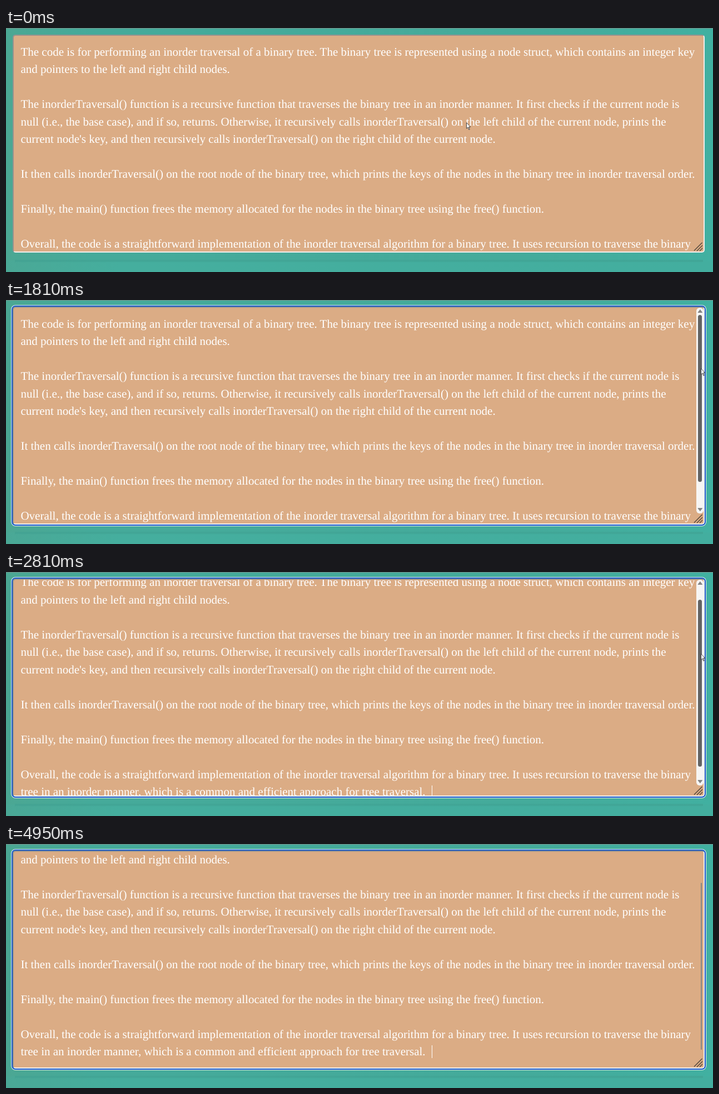
Write an HTML page that moves like this. It is 1272x440 px and loops after 5.23 s.

```html
<!DOCTYPE html>
<html lang="en">
<head>
<meta charset="utf-8">
<title>Scrolling text area</title>
<style>
  html, body { margin: 0; width: 100%; height: 100%; overflow: hidden; }
  body { background: #45ae9e; }
  #stage { position: relative; width: 1272px; height: 440px; overflow: hidden;
    background: linear-gradient(90deg, #4ba793, #45aa9a 12%, #44ab9b 75%, #41b0a1); }
  #stage div, #stage svg { position: absolute; box-sizing: border-box; }

  .topline { left: 0; top: 0; width: 1272px; height: 1px; background: #75908a; }
  .below { left: 0; top: 419px; width: 1272px; height: 21px;
    background: linear-gradient(90deg, #4aa896, #45ae9e 16%, #43ae9f); }
  .shade { left: 16px; top: 417px; width: 1238px; height: 6px;
    background: linear-gradient(#3f9f9000, #3f9f90b0, #3f9f9000); }

  #box { left: 12px; top: 12px; width: 1245px; height: 393px;
    border: 2px solid; border-color: #98938e #f1eeec #f1eeec #98938e;
    border-radius: 5px; background: #dbac85; }
  #box.focus { box-shadow: 0 0 0 2px #1458c8, 0 0 0 3px #e4efee; }
  #clip { left: 0; top: 0; width: 1241px; height: 389px; overflow: hidden; border-radius: 3px; }
  #text { left: 12.4px; white-space: pre; color: #fff;
    font: 21.03px/31.5px "Liberation Serif", "Times New Roman", serif;
    text-rendering: geometricPrecision; }
  #caret { left: 740px; top: 382px; width: 1px; height: 23px; background: #fff; }

  #track { left: 1241.5px; top: 14px; width: 13.5px; height: 371px;
    border-radius: 6px; background: #f6f5f4; }
  #thumb { height: 301px; border-radius: 4px; background: #858585; }
  #thumb.wide { left: 1245px; width: 7px; }
  #thumb.thin { left: 1250px; width: 2px; }
  #thumb.pressed { background: #636363; }
</style>
</head>
<body>
<div id="stage">
  <div class="topline"></div>
  <div class="below"></div>
  <div class="shade"></div>
  <div id="box">
    <div id="clip">
      <div id="text">The code is for performing an inorder traversal of a binary tree. The binary tree is represented using a node struct, which contains an integer key
and pointers to the left and right child nodes.

The inorderTraversal() function is a recursive function that traverses the binary tree in an inorder manner. It first checks if the current node is
null (i.e., the base case), and if so, returns. Otherwise, it recursively calls inorderTraversal() on the left child of the current node, prints the
current node's key, and then recursively calls inorderTraversal() on the right child of the current node.

It then calls inorderTraversal() on the root node of the binary tree, which prints the keys of the nodes in the binary tree in inorder traversal order.

Finally, the main() function frees the memory allocated for the nodes in the binary tree using the free() function.

Overall, the code is a straightforward implementation of the inorder traversal algorithm for a binary tree. It uses recursion to traverse the binary
tree in an inorder manner, which is a common and efficient approach for tree traversal.<div id="caret"></div></div>
    </div>
  </div>
  <svg style="left:1237px;top:386px" width="18" height="18" fill="none" stroke="#4d4339" stroke-width="1.3">
    <path d="M1 15.5 15.5 1M6 16 16 6M11 16 16 11"/>
  </svg>
  <div id="track">
    <svg style="left:0;top:0" width="14" height="371" fill="#858585" stroke="#858585" stroke-linejoin="round">
      <path d="M3 8.5 6.8 3.5 10.6 8.5ZM3 361.5 6.8 366.5 10.6 361.5Z"/>
    </svg>
  </div>
  <div id="thumb"></div>
  <svg id="cursor" style="left:0;top:0" width="9" height="15" fill="#fff" stroke="#333" stroke-width=".9" stroke-linejoin="round">
    <path d="M.5.6V11.2L3 9 4.8 13.4 6.3 12.8 4.6 8.5H7.7Z"/>
  </svg>
</div>
<script>
const LOOP = 5230;
const $ = id => document.getElementById(id);

// Each track holds [start time, value...] steps.
const cursorTrack = [
  [0, 828, 170], [130, 827, 169], [270, 764, 296], [400, 1255, 123],
  [550, 1239, 122], [700, 1225, 121], [830, 1228, 121], [980, 1238, 122],
  [1100, 1244, 122], [1240, 1250, 122], [1810, 1250, 123], [2240, 1251, 124],
  [2390, 1251, 128], [2540, 1251, 131], [2670, 1250, 139], [2810, 1250, 147],
  [2930, 1248, 158], [3050, 1246, 168], [3200, 1244, 178], [3330, 1242, 187],
  [3480, 1243, 188], [3780]
];
const scrollTrack = [
  [0, 0], [2240, 1], [2390, 4], [2540, 8], [2670, 16],
  [2810, 24.5], [2930, 36], [3050, 45.5], [3200, 46.5]
];
const barTrack = [
  [0, ""], [550, "wide"], [700, "thin"], [980, "wide"],
  [1810, "wide pressed"], [3630, "wide"], [3910, "thin"]
];
const caretTrack = [
  [0, false], [2810, true], [3330, false], [3780, true], [4330, false], [4950, true]
];

const at = (track, t) => track.findLast(step => step[0] <= t).slice(1);
const show = (el, visible) => { el.style.visibility = visible ? "visible" : "hidden"; };

function draw(now) {
  const t = now % LOOP;
  const [x, y] = at(cursorTrack, t);
  const [scroll] = at(scrollTrack, t);
  const [bar] = at(barTrack, t);

  show($("cursor"), x !== undefined);
  if (x !== undefined) $("cursor").style.transform = `translate(${x}px, ${y}px)`;

  $("text").style.top = `${13.6 - scroll}px`;
  show($("caret"), at(caretTrack, t)[0]);
  $("box").className = t >= 1810 ? "focus" : "";

  show($("track"), bar.startsWith("wide"));
  show($("thumb"), bar !== "");
  $("thumb").className = bar;
  $("thumb").style.top = `${27.3 + scroll * 0.92}px`;
}

function tick() {
  draw(performance.now());
  requestAnimationFrame(tick);
}
tick();
</script>
</body>
</html>
```
